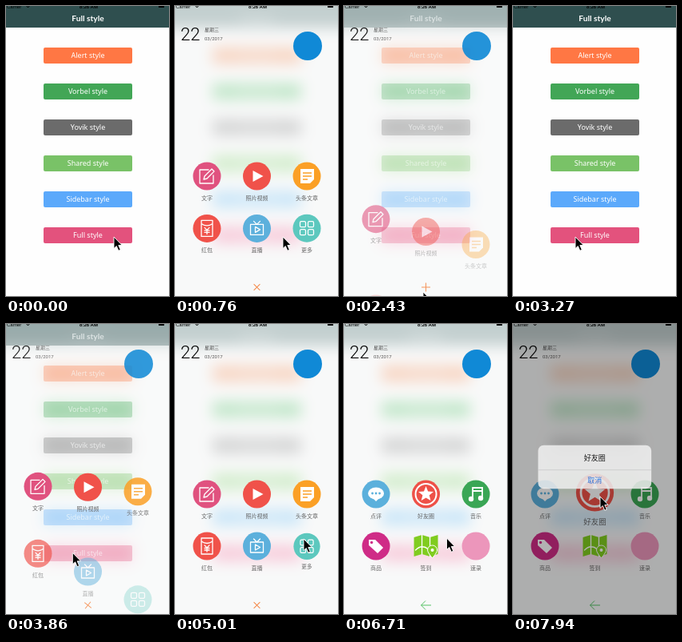
Recreate the animation shown at these times as an HTML page. Size 204 px wide and 363 px high, loop 7990 ms.

```html
<!DOCTYPE html>
<html lang="zh-CN">
<head>
<meta charset="utf-8">
<title>Full style menu</title>
<style>
  html, body { margin: 0; width: 100%; height: 100%; overflow: hidden; background: #fefefe; }
  svg { display: block; width: 100%; height: 100%; }
  text { font-family: "Noto Sans CJK SC", "Noto Sans CJK", sans-serif; text-anchor: middle; }
  #menu text { font: 9px "Noto Sans", sans-serif; fill: #fff; }
  #menu .title { font: bold 10.2px Lato, sans-serif; }
  #status text { font: 6px "Liberation Sans", sans-serif; }
  .label { font-size: 7px; fill: #666; }
  .start { text-anchor: start; }
  .line { fill: none; stroke: #fff; stroke-width: 1.3; stroke-linejoin: round; stroke-linecap: round; }
  .white { fill: #fff; }
</style>
</head>
<body>
<svg viewBox="0 0 204 363">
  <defs>
    <filter id="blur" filterUnits="userSpaceOnUse" x="-40" y="-40" width="284" height="443" color-interpolation-filters="sRGB">
      <feGaussianBlur stdDeviation="9"/>
      <feColorMatrix type="saturate" values="1.5"/>
    </filter>
  </defs>
  <g id="menu">
    <rect x="-40" y="-40" width="284" height="443" fill="#fefefe"/>
    <rect x="-40" y="-40" width="284" height="67" fill="#2f4f4f"/>
    <text class="title" x="102.5" y="19">Full style</text>
  </g>
  <g id="overlay">
    <rect width="204" height="363" fill="#f7f8f8"/>
    <use href="#menu" filter="url(#blur)" opacity=".24"/>
  </g>
  <g id="header">
    <text class="start" x="7" y="42.500" style="font:300 22px Roboto,sans-serif">22</text>
    <text class="start" x="37" y="31.5" font-size="6" fill="#555">星期三</text>
    <text class="start" x="37" y="43" style="font:6px Roboto,sans-serif" fill="#555">03/2017</text>
    <circle cx="166" cy="50" r="18" fill="#1089d6"/>
    <path id="cross" d="M-5.5 0H5.5M0-5.5V5.5" stroke="#f58a4b" fill="none"/>
    <path id="back" d="M109 352H96.500M102 346.500L96.500 352L102 357.500" stroke="#55c264" fill="none"/>
  </g>
  <g id="items"></g>
  <g id="status">
    <text class="start" x="1" y="2.500">Carrier</text>
    <path d="M25-1L27.500 2L30-1" fill="none" stroke="#000"/>
    <text x="103.500" y="2.800" style="font-weight:bold">8:26 AM</text>
    <rect x="191" y="-1" width="7" height="3"/>
  </g>
  <rect id="dim" width="204" height="363"/>
  <g id="alert">
    <rect x="-66.500" y="-26" width="133" height="51" rx="6.500" fill="#f0f0f0"/>
    <path d="M-66.500 3H66.500" stroke="#c6c6c8" stroke-width=".6"/>
    <text y="-8" font-size="8.500" font-weight="500">好友圈</text>
    <text y="18" font-size="8.500" font-weight="500" fill="#1b78f2">取消</text>
  </g>
  <path id="cursor" d="M0 0V14.500L3.300 11.500L5.800 17.300L8.300 16.200L5.800 10.500H10.200Z" stroke="#fff" stroke-width=".9"/>
</svg>
<script>
const LOOP = 7990;
const $ = id => document.getElementById(id);
const clamp = v => Math.min(1, Math.max(0, v));
const span = (t, from, to) => clamp((t - from) / (to - from));
const smooth = p => p * p * (3 - 2 * p);
const easeOut = p => 1 - (1 - p) ** 3;
const place = (el, x, y, extra = '') => el.setAttribute('transform', `translate(${x} ${y}) ${extra}`);
const fade = (el, a) => el.setAttribute('opacity', a);

[['Alert', '#ff7744'], ['Vorbel', '#42a656'], ['Yovik', '#6b6b6b'],
 ['Shared', '#79c267'], ['Sidebar', '#5ba9fb'], ['Full', '#e3527d']].forEach(([name, color], i) => {
  const y = 52 + i * 45;
  $('menu').insertAdjacentHTML('beforeend',
    `<rect x="47" y="${y}" width="111" height="20" rx="2" fill="${color}"/>
     <text x="102.500" y="${y + 12.8}">${name} style</text>`);
});

const path = (d, cls = 'line') => `<path class="${cls}" d="${d}"/>`;
const star = Array.from({ length: 10 }, (_, i) => {
  const r = i % 2 ? 4.4 : 10, a = i * Math.PI / 5;
  return `${r * Math.sin(a)},${-r * Math.cos(a)}`;
}).join(' ');
const dots = [-4.5, 0, 4.5].map(x => `<circle cx="${x}" cy="-1" r="1.400"/>`).join('');
const squares = [-8.5, 1.5].flatMap(x => [-8.5, 1.5].map(y =>
  `<rect class="line" x="${x}" y="${y}" width="7" height="7" rx="1.500"/>`)).join('');

const icons = [
  ['文字', '#e0527f', path('M2-8H-9V9H8V-1M-4 4L-3 0L6-9L9-6L0 3Z')],
  ['照片视频', '#f0524a', path('M-5-7L8 0L-5 7Z', 'white')],
  ['头条文章', '#fba026', path('M-8-9H9V4L4 9H-8Z', 'white') +
    '<path d="M-5-4H6M-5 0H6M-5 4H1" stroke="#fba026" stroke-width="1.500"/>'],
  ['红包', '#f0524a', path('M-7-10H7V10H-7ZM-7-6Q0-1 7-6M-3-1L0 2L3-1M0 2V7M-3 2.500H3M-3 5H3')],
  ['直播', '#5cb0dc', path('M-8-5H8V8H-8ZM-4-9L0-5L4-9') + path('M-2-2L4 1.500L-2 5Z')],
  ['更多', '#5cc8be', squares],
  ['点评', '#5bb0dc', '<ellipse class="white" cy="-1" rx="10" ry="7.500"/>' + path('M-4 5H4L0 9Z', 'white') +
    `<g fill="#5bb0dc">${dots}</g>`],
  ['好友圈', '#ee5148', `<circle class="line" r="13" style="stroke-width:2"/><polygon class="white" points="${star}"/>`],
  ['音乐', '#3aa655', '<path d="M-4 6V-8H8V5M-4-4H8" fill="none" stroke="#fff" stroke-width="1.800"/>' +
    '<circle class="white" cx="-6" cy="6" r="3.200"/><circle class="white" cx="6" cy="5" r="3.200"/>'],
  ['商品', '#cf2c87', path('M-9-8L-1-8L9 2L2 9L-9-1Z', 'white') + '<circle cx="-5.500" cy="-4.500" r="1.700" fill="#cf2c87"/>'],
  ['签到', '', '<path d="M-15-11L-5-14L5-11L15-14V10L5 13L-5 10L-15 13Z" fill="#80cc20"/>' +
    path('M-5-14V10M5-11V13M-13 5Q-5-3 3 4') +
    '<path d="M8 15Q2 8 2 5A6 6 0 0 1 14 5Q14 8 8 15Z" fill="#80cc20" stroke="#fff"/><circle class="white" cx="8" cy="5" r="2"/>'],
  ['速录', '#ec96bb', '']
];
const items = icons.map(([label, color, glyph]) => {
  const g = document.createElementNS('http://www.w3.org/2000/svg', 'g');
  g.innerHTML = (color && `<circle cy="-6" r="17.500" fill="${color}"/>`) +
    `<g transform="translate(0 -6)">${glyph}</g><text class="label" y="23.500">${label}</text>`;
  return $('items').appendChild(g);
});

// time, x, y of the pointer tip
const pointer = [
  [0, 135, 289], [1050, 135, 289], [1630, 99, 358], [2500, 99, 358], [2830, 120, 321],
  [3270, 78, 289], [3750, 78, 289], [4370, 141, 258], [4770, 161, 269], [5780, 161, 269],
  [5890, 128.5, 268], [6720, 128.5, 268], [6830, 120, 259], [7000, 120, 259], [7300, 92, 222],
  [7520, 109, 216], [LOOP, 109, 216]
];
function pointerAt(t) {
  const i = pointer.findIndex(k => k[0] > t);
  const [t0, x0, y0] = pointer[i - 1], [t1, x1, y1] = pointer[i];
  const p = smooth(span(t, t0, t1));
  return [x0 + (x1 - x0) * p, y0 + (y1 - y0) * p];
}

const spring = p => p >= 1 ? 0 : Math.exp(-6 * p) * Math.cos(6 * p);

function draw(t) {
  const opened = t < 3000 ? 120 : 3630;
  const closing = t > 2040 && t < 3000;
  const shown = span(t, opened, opened + 320) * (t < 3000 ? 1 - span(t, 2320, 2790) : 1);
  fade($('overlay'), shown);
  fade($('header'), clamp(shown * 1.2));

  const turn = smooth(span(t, opened, opened + 300)) - (closing ? smooth(span(t, 2040, 2340)) : 0);
  place($('cross'), 102.5, 352, `rotate(${45 * turn})`);
  const swap = span(t, 5060, 5240);
  fade($('cross'), 1 - swap);
  fade($('back'), swap);

  const page = easeOut(span(t, 5060, 5300)) - easeOut(span(t, 6250, 6420)) + easeOut(span(t, 6590, 6720));
  const press = span(t, 7820, 7930);
  items.forEach((item, i) => {
    const slot = i % 6, start = opened + slot * 35;
    const p = span(t, start, start + 570);
    let drop = spring(p), alpha = clamp(p * 3);
    if (closing) {
      const begin = 2060 + (5 - slot) * 35;
      drop = smooth(span(t, begin, begin + 475));
      alpha = clamp(1 - 1.15 * drop);
    }
    const second = i > 5;
    if (second && t < 5000) alpha = 0;
    const scale = i === 7 ? 1 + .35 * press : i === 5 && t >= 5010 && t < 5120 ? .95 : 1;
    const x = 40 + slot % 3 * 62.5 + 204 * (second - page);
    const y = 219 + (slot > 2 ? 65 : 0) + 145 * drop;
    place(item, x, y, `scale(${scale})`);
    fade(item, alpha);
  });

  const alert = span(t, 7820, 8000);
  fade($('dim'), .45 * alert);
  fade($('alert'), Math.min(.85, alert * 1.4));
  place($('alert'), 102.3, 179.5, `scale(${1.2 - .2 * alert})`);
  place($('cursor'), ...pointerAt(t));
}

const begin = performance.now();
function tick() {
  draw((performance.now() - begin) % LOOP);
  requestAnimationFrame(tick);
}
tick();
</script>
</body>
</html>
```
